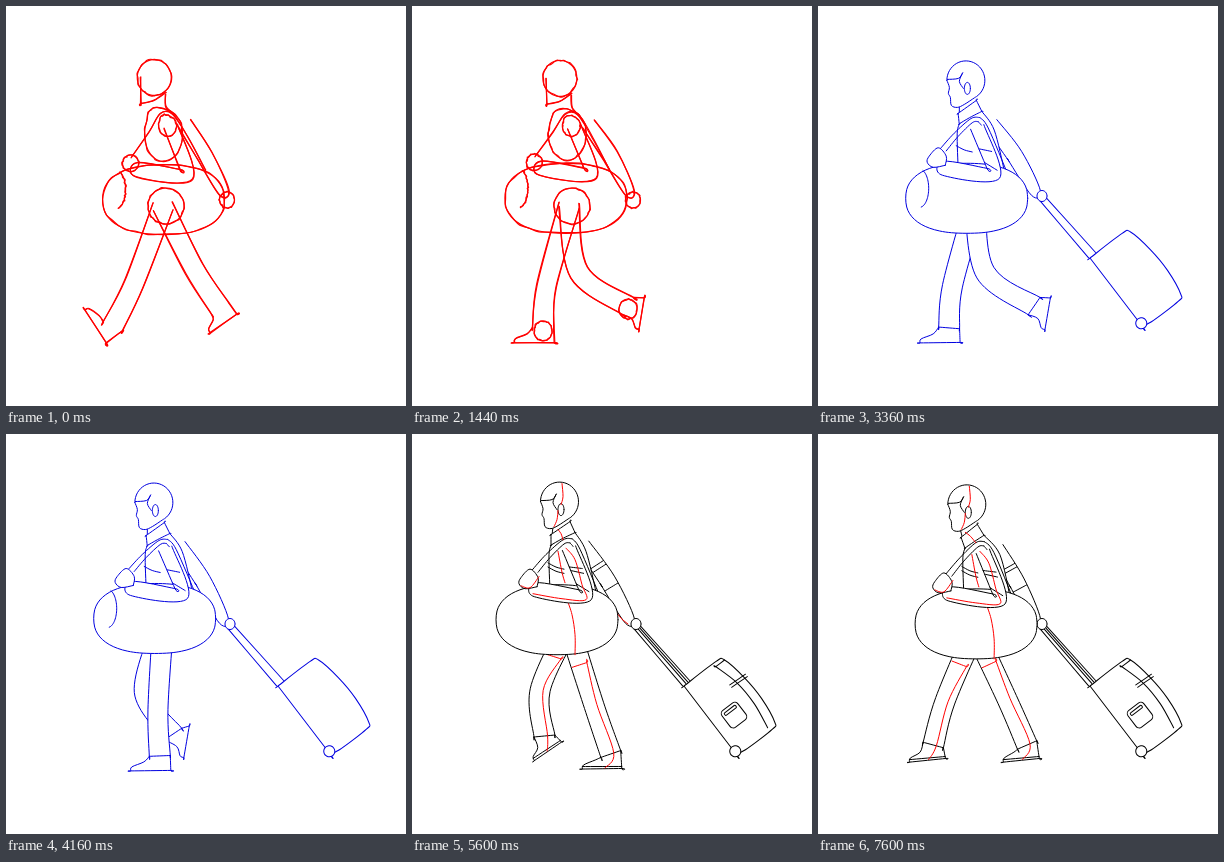
Animation, 400 px wide and 400 px high, one loop 7.68 s. Source, as an HTML page with a canvas:

```html
<!DOCTYPE html>
<html lang="en">
<head>
<meta charset="utf-8">
<title>Walk cycle</title>
<style>
html, body { margin: 0; width: 100%; height: 100%; overflow: hidden; background: #fff; }
canvas { display: block; width: 400px; height: 400px; }
</style>
</head>
<body>
<canvas id="stage" width="400" height="400"></canvas>
<script>
const ctx = document.getElementById('stage').getContext('2d');
const STEP = 80, CYCLE = 16, STEPS = 96;
const RED = '#f00', BLUE = '#0000e0', BLACK = '#000';
const BODY = 0, FAR = 1, BAG = 2;
const { cos, sin, hypot, exp, tanh, PI } = Math;
let phase, ink, rough, headDy, bagDy, sway;

// Geometry helpers
const clamp = v => Math.max(0, Math.min(1, v));
const mix = (a, b, t) => [a[0] + (b[0] - a[0]) * t, a[1] + (b[1] - a[1]) * t];
const noise = n => { const s = sin(n * 127.1 + phase * 31.7) * 43758.5; return s - Math.floor(s) - 0.5; };
const points = text => text.split(' ').map(p => p.split(',').map(Number));
const unit = (a, b) => {
  const len = hypot(b[0] - a[0], b[1] - a[1]) || 1;
  return [(b[0] - a[0]) / len, (b[1] - a[1]) / len];
};

// Superellipse arc; a power below 1 makes it boxier
function arc(x, y, rx, ry, from = 0, to = 2 * PI, power = 1) {
  const bend = v => Math.sign(v) * Math.abs(v) ** power;
  return Array.from({ length: 33 }, (_, i) => {
    const a = from + (to - from) * i / 32;
    return [x + rx * bend(cos(a)), y + ry * bend(sin(a))];
  });
}

// Front and back edges of a limb around its joints
function limb(joints, widths) {
  const edge = side => joints.map((j, i) => {
    const u = unit(joints[i - 1] || j, j), v = unit(j, joints[i + 1] || j);
    const t = unit([0, 0], [u[0] + v[0], u[1] + v[1]]);
    return [j[0] - t[1] * side * widths[i], j[1] + t[0] * side * widths[i]];
  });
  return { front: edge(1), back: edge(-1) };
}

// Moves a rest-pose point to its place in the current phase
function pose([x, y], part = BODY) {
  if (part === BAG) return [x + sway, y + bagDy];
  const low = clamp((y - 100) / 45);
  const hold = part === FAR ? 1 - clamp((x - 172) / 40) : 1;
  const dx = sway * (0.1 + 0.5 * clamp((y - 95) / 12));
  return [x + dx * hold, y + (headDy * (1 - low) + bagDy * low) * hold];
}

// Smooth curve through points; a repeated point makes a corner
function trace(pts) {
  ctx.beginPath();
  ctx.moveTo(...pts[0]);
  for (let i = 0; i < pts.length - 1; i++) {
    const a = pts[i], b = pts[i + 1], p = pts[i - 1] || a, n = pts[i + 2] || b;
    ctx.bezierCurveTo(a[0] + (b[0] - p[0]) / 6, a[1] + (b[1] - p[1]) / 6,
      b[0] - (n[0] - a[0]) / 6, b[1] - (n[1] - a[1]) / 6, b[0], b[1]);
  }
}

function draw(pts, fill = false, color = ink) {
  ctx.strokeStyle = color;
  ctx.fillStyle = '#fff';
  trace(pts);
  if (fill && !rough) ctx.fill();
  ctx.stroke();
  if (!rough) return;
  trace(pts.map(([x, y]) => [x + 1.6 * noise(x + y), y + 1.6 * noise(x - y)]));
  ctx.stroke();
}

const shape = (pts, part, fill = true) => draw(pts.map(p => pose(p, part)), fill);
const line = (text, part, color = ink) => draw(points(text).map(p => pose(p, part)), false, color);

function leg(p) {
  const a = p * PI / 8;
  const plant = tanh(3 * sin(a + PI / 8));
  const swing = -0.06 - 0.41 * cos(a) + 0.11 * sin(a) + 0.11 * cos(2 * a);
  const thigh = 76 + 8 * plant;
  const hip = [157, 190 + bagDy];
  const knee = [hip[0] + thigh * sin(swing), hip[1] + thigh * cos(swing)];
  const ankle = [165 - 53.5 * cos(a) - 6.6 * sin(a) + 4 * sin(2 * a) - 4.6 * cos(4 * a), 311 + 11 * plant];

  // Toe points down while lifted and flicks up on landing
  const roll = exp(-4 * p * p) - 1.4 * exp(-(((p - 11) / 3.1) ** 4));
  const foot = (x, y) => [ankle[0] + x * cos(roll) - y * sin(roll), ankle[1] + x * sin(roll) + y * cos(roll)];
  const toeX = -25 - 4 * plant;
  const { front, back } = limb([hip, knee, ankle], [10.5, 10, 10.5]);
  const heel = foot(11, 14.5);

  draw([...front, front[2], foot(toeX * 0.55, 6), foot(toeX + 1, 11), foot(toeX, 15), foot(toeX, 15),
    heel, heel, back[2], back[2], back[1], back[0]], true);
  if (rough) {
    if (p % 8) draw(arc(ankle[0], ankle[1] + 3, 9, 10));
    return;
  }
  draw([front[2], back[2]]);
  if (ink !== BLACK) return;
  draw([foot(toeX, 12.5), foot(11, 12.5)]);
  const across = (i, t) => mix(front[i], back[i], t);
  const hem = t => mix(across(0, t), across(1, t), 0.48);
  draw([hem(0.05), hem(0.8), hem(0.8), across(1, 0.65), across(2, 0.65), foot(-6, 14)], false, RED);
}

function legs() {
  leg((phase + 8) % CYCLE);
  leg(phase);
}

function arm(text, widths, part) {
  const edges = limb(points(text).map(p => pose(p, part)), widths);
  const { front, back } = edges;
  draw([front[0], front[1], front[1], front[2], back[2], back[1], back[0]], true);
  return edges;
}
const nearArm = () => arm('157,113 173,158 123,153', [7, 8, 7]);
const farArm = () => arm('171,110 196,146 218,187', [7, 8, 5], FAR);

// Sleeve stripe across segment i of an arm
const stripe = ({ front, back }, i, t) =>
  draw([mix(front[i], front[i + 1], t), mix(back[i], back[i + 1], t)]);

function bag() {
  shape(arc(145, 183, 61, 35, 0, 2 * PI, 0.85), BAG);
  if (ink === BLACK) line('155,163 160,178 163,198 163,218', BAG, RED);
  else shape(arc(98, 173, 9, 19, -1.2, 1.4), BAG, false);
}

function sketch() {
  shape(arc(147, 65, 17, 18));
  line('133,65 134,91 134,91 147,88 159,80');
  line('158,82 159,94 164,102');
  shape(arc(150, 120, 19, 25));
  shape(arc(154, 112, 9, 10));
  shape(arc(117, 147, 8, 8));
  line('118,141 136,117 150,101 162,101 174,122 192,154');
  nearArm();
  farArm();
  shape(arc(221, 194, 7.5, 8), FAR);
  bag();
  draw(arc(160, 200, 18, 18));
  legs();
}

// Drawn along its own tilted axis, from the handle side to the wheel
function suitcase() {
  const black = ink === BLACK;
  ctx.save();
  ctx.translate(272, 252);
  ctx.rotate(0.917);
  for (const i of black ? [0, 1, 1.6, 2.2] : [0, 2.2]) draw([[-78, 5 - 3 * i], [-1, 1 - 4 * i]]);
  const top = points('4,-48 30,-53 57,-54 84,-50');
  draw([[0, 0], [0, 0], [0, -40], ...top, [88, -44], [88, -10], [85, 0], [85, 0], [0, 0]], true);
  if (black) {
    draw([[4, -48], [4, -37], [4, -37], ...top.slice(1).map(([x, y]) => [x, y + 9])]);
    for (const x of [27, 30]) draw([[x, -37], [x + 1, -56]]);
    ctx.beginPath();
    ctx.roundRect(43, -32, 21, 20, 4);
    ctx.roundRect(46, -29, 3, 14, 1);
    ctx.stroke();
  }
  draw(arc(83, -1, 5.5, 5.5), true);
  ctx.restore();
}

function head() {
  const black = ink === BLACK;
  line('141,92 140,101');
  shape([...arc(147.5, 67, 19, 19.5, PI, 2.35 * PI),
    ...points('146,91 139,94 133,92 132,84 130,80 131,74 128.5,67')]);
  line('129,66 140,65 144,60 144,60 141,68 145,75');
  shape(arc(149, 75, 3, 6));
  shape(points('139,100 139,100 158,87 158,87 163,98 163,98 150,104 139,110 139,110 139,100'));
  if (!black) return;
  line('150,49 151,62 149,70', BODY, RED);
  line('146,76 145,85 142,92', BODY, RED);
  line('146,95 149,99 151,105', BODY, RED);
}

function figure() {
  const black = ink === BLACK;
  suitcase();
  const far = farArm();
  shape(arc(224, 190, 5, 5.5), FAR);
  if (black) {
    for (const t of [0.55, 0.65]) stripe(far, 0, t);
    stripe(far, 1, 0.15);
    line('204,177 209,184 216,190', FAR, RED);
  }
  legs();
  shape(points('140,109 137,119 138,155 138,155 184,155 184,155 174,116 163,98'));
  for (const y of black ? [127, 131] : [131]) line(`136,${y} 144,${y + 4} 152,${y + 6}`);
  line('160,104 168,114 188,160');
  line('158,108 165,118 183,160');
  bag();

  const near = nearArm();
  for (const t of black ? [0.42, 0.51, 0.85] : [0.5, 0.85]) stripe(near, 0, t);
  if (black) {
    line('154,113 163,124 170,148 174,163 150,162 121,157', BODY, RED);
    line('146,116 150,136 153,146', BODY, RED);
  }
  line('120,134 134,119 151,105 160,104');
  line('126,136 138,122 152,109 158,108');
  shape(points('125,150 113,152 107,147 109,141 118,133 126,141 125,150'));
  if (black) line('109,149 118,151 127,140', BODY, RED);
  head();
}

function render(now) {
  const step = Math.floor(now / STEP) % STEPS;
  phase = step % CYCLE;
  ink = [RED, BLUE, BLACK][Math.floor(step / 32)];
  rough = ink === RED;
  headDy = 4 + 4.2 * cos((phase - 1.2) * PI / 4);
  bagDy = 6 + 5.6 * cos((phase - 0.8) * PI / 4);
  sway = 6.3 + 6.8 * cos((phase + 1) * PI / 8);
  ctx.fillStyle = '#fff';
  ctx.fillRect(0, 0, 400, 400);
  ctx.lineWidth = rough ? 1.2 : 1;
  ctx.lineJoin = ctx.lineCap = 'round';
  if (rough) sketch(); else figure();
}

const start = performance.now();
function tick() {
  render(performance.now() - start);
  requestAnimationFrame(tick);
}
tick();
</script>
</body>
</html>
```
